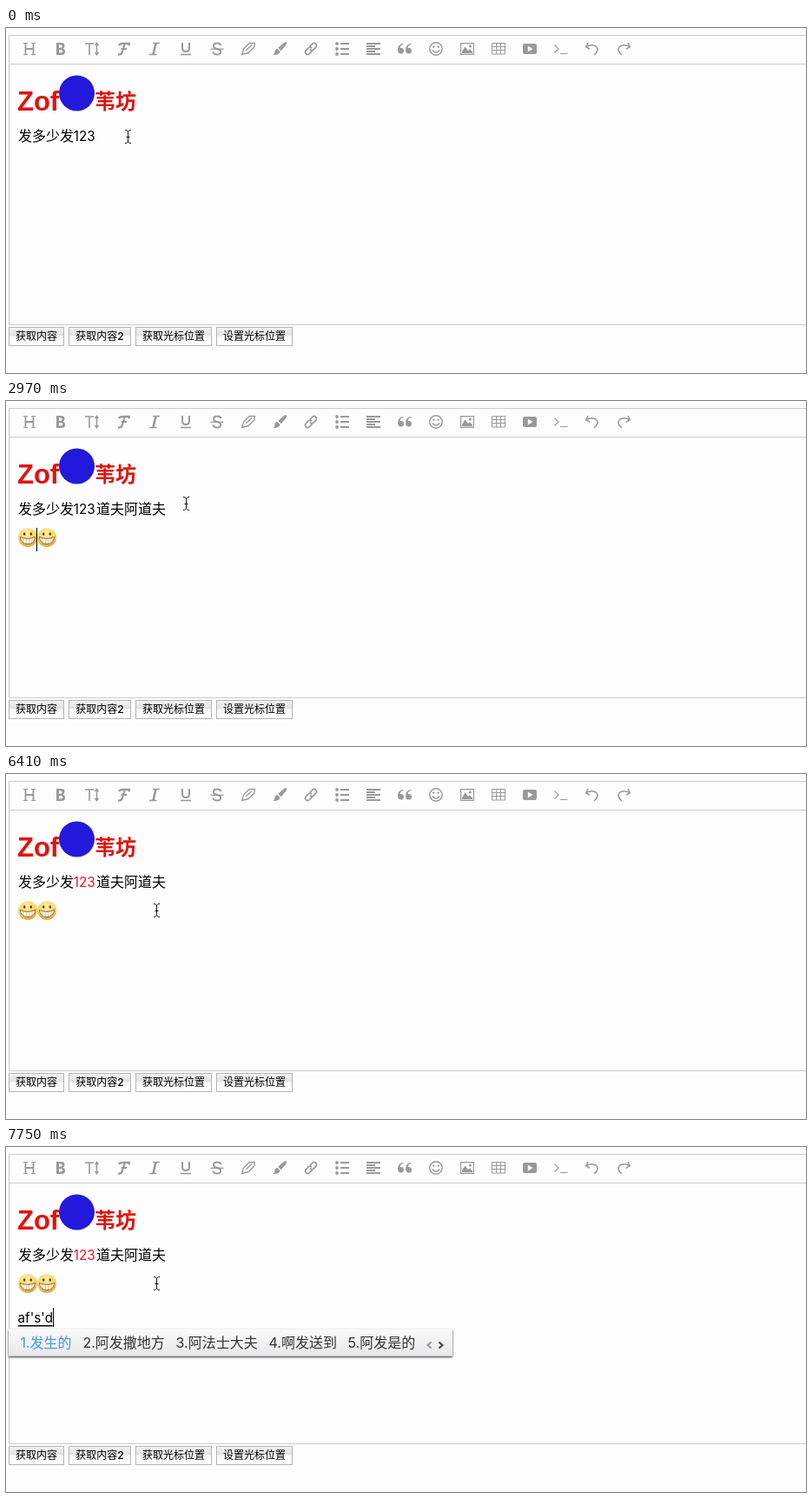
Write an HTML page that moves like this. It is 921x397 px and loops after 8000 ms.

```html
<!DOCTYPE html>
<html lang="zh-CN">
<head>
<meta charset="utf-8">
<title>Editor</title>
<style>
html, body { margin: 0; width: 100%; height: 100%; overflow: hidden; background: #fdfdfd; }
svg { display: block; width: 921px; height: 397px; }
text { font-family: Inter, "Noto Sans CJK SC", "Noto Sans CJK", "Noto Sans CJK JP", sans-serif; font-size: 16px; white-space: pre; }
.line { fill: none; stroke: #ccc; }
.latin { font-size: 15.2px; }
#tools { fill: none; stroke: #999; stroke-width: 1.6; }
#tools .solid { fill: #999; stroke: none; }
#tools .cut { fill: #fdfdfd; stroke: none; }
#buttons text { font-size: 12px; font-weight: 500; }
#buttons rect { fill: url(#btn); stroke: #b4b4b4; }
#brand text { font-weight: 700; fill: #e0140f; }
</style>
</head>
<body>
<svg viewBox="0 0 921 397">
  <defs>
    <linearGradient id="btn" x2="0" y2="1">
      <stop offset="0" stop-color="#f3f3f3"/>
      <stop offset=".42" stop-color="#e2e2e2"/>
      <stop offset=".5" stop-color="#f8f8f8"/>
      <stop offset="1" stop-color="#fff"/>
    </linearGradient>
    <linearGradient id="bar" x2="0" y2="1">
      <stop offset="0" stop-color="#fafafa"/>
      <stop offset="1" stop-color="#e7e7e9"/>
    </linearGradient>
    <radialGradient id="skin" cx=".45" cy=".3" r=".75">
      <stop offset="0" stop-color="#fff0a8"/>
      <stop offset=".6" stop-color="#fad465"/>
      <stop offset="1" stop-color="#d9952f"/>
    </radialGradient>
    <filter id="shade" x="-5%" y="-30%" width="110%" height="180%">
      <feDropShadow dx="0" dy="1.2" stdDeviation="1.2" flood-color="#000" flood-opacity=".9"/>
    </filter>
    <g id="grin">
      <ellipse rx="10.9" ry="10.8" fill="url(#skin)"/>
      <ellipse cx="-3.8" cy="-4" rx="1.3" ry="1.8" fill="#5c3a12"/>
      <ellipse cx="3.8" cy="-4" rx="1.3" ry="1.8" fill="#5c3a12"/>
      <path d="M-8.6-.6Q0 3.4 8.6-.6Q8 7.4 0 7.6Q-8 7.4-8.6-.6Z" fill="#fffdf2" stroke="#8a5a1c" stroke-width=".9"/>
      <path d="M-5 1V6M-1.7 1.6V7.4M1.7 1.6V7.4M5 1V6" stroke="#b99a62" stroke-width=".6"/>
    </g>
  </defs>

  <path class="line" d="M921 8.5H3.5V341.5H921M3.5 41.5H921"/>
  <g id="tools"></g>
  <g id="brand">
    <text x="13" y="95" style="font:700 31px 'Liberation Sans',Arial,sans-serif">Zof</text>
    <circle cx="81.5" cy="75" r="20.5" fill="#2319dc"/>
    <text x="102" y="93" style="font-size:24px">苇坊</text>
  </g>

  <text x="14" y="130">发多少发</text>
  <text id="digits" class="latin" x="77.8" y="130">123</text>
  <g id="added">
    <text x="104" y="130">道夫阿道夫</text>
    <use href="#grin" x="25" y="157"/>
    <use href="#grin" x="47" y="157"/>
  </g>
  <text id="typed" class="latin" x="13.6" y="202"></text>
  <rect id="under" x="14" y="205" height="1.5"/>
  <rect id="caret" width="1"/>

  <g id="picker">
    <rect x="3" y="209.5" width="511" height="31" fill="url(#bar)" filter="url(#shade)"/>
    <g id="words" fill="#333"></g>
    <path d="M489.5 224.5L485.5 228L489.5 231.5" fill="none" stroke="#999" stroke-width="2"/>
    <path d="M498.5 224.5L502.5 228L498.5 231.5" fill="none" stroke="#444" stroke-width="2.2"/>
  </g>

  <g id="buttons"></g>
  <g id="mouse" fill="none">
    <path d="M-3-7.5H-1.5L.5-6L2.5-7.5H4M.5-6V6M-3 7.5H-1.5L.5 6L2.5 7.5H4M-1.5 .5H2.5" stroke="#111"/>
  </g>
</svg>

<script>
const $ = id => document.getElementById(id);
const solid = d => `<path class="solid" fill-rule="evenodd" d="${d}"/>`;
const cut = d => `<path class="cut" d="${d}"/>`;
const path = (d, w = 1.6) => `<path d="${d}" stroke-width="${w}"/>`;

const undo = path("M-7-2.5Q-1-5.5 4-3Q9 1 2 7M-5-7L-7.3-2.3L-2.8 .3", 1.5);
const icons = [
  // heading, bold, size, font, italic
  path("M-4.5-6.5V6.5M4.5-6.5V6.5M-4.5 0H4.5", 1.8) + path("M-7-6.5H-2M2-6.5H7M-7 6.5H-2M2 6.5H7", 1.2),
  solid("M-5-7H1Q4.5-6.8 4.5-3.4Q4.4-1 2.5-.3Q5.2 .5 5.2 3.3Q5 7 1 7H-5ZM-2-4.7V-1.3H0Q1.6-1.4 1.6-3Q1.6-4.7 0-4.7ZM-2 1V4.6H.4Q2.2 4.5 2.2 2.8Q2.2 1 .4 1Z"),
  path("M-8-6H2M-3-6V7M5.5-5V5", 1.6) + solid("M5.5-8L8.3-4H2.7ZM5.5 8L8.3 4H2.7Z"),
  path("M-5-4Q-4-6.2-1-6.2H7L6.2-3.6M1.8-6L-1.5 4.5Q-2.5 7-6 6.5M-2.5 0H4", 2.2),
  path("M1.5-6.5L-1.5 6.5", 2.6) + path("M-2-6.5H6M-6 6.5H2.5", 1.4),
  path("M-4-7V-1Q-4 3 0 3Q4 3 4-1V-7", 2) + path("M-6 6.5H6", 1.6),
  path("M4.5-4Q3.5-6.7 0-6.5Q-4-6.4-4-3.5Q-4-1 0 0Q4.4 1.2 4.2 3.5Q4 6.5 0 6.5Q-4 6.5-4.8 3.5", 1.9) + path("M-7.5 .3H7.5", 1.3),
  // marker, brush, link
  path("M-7.3 6.5L-5.5 0L1-6.5H7.3L6.8-2L0 4.5ZM-2.8 1.7L4-4.5", 1.4),
  solid("M7.8-7.5Q8.8-6.5 7.2-4.3L1.7 2.2L-1.8-1.2L5.3-7.2Q7-8.4 7.8-7.5ZM-2.5 0L.5 3Q0 7.4-7.8 7Q-5.8 6-5.5 3Q-5-.2-2.5 0Z"),
  `<g transform="rotate(-45)">${path("M-1 2.8H-5Q-8 2.8-8 0Q-8-2.8-5-2.8H-2Q1.3-2.8 1.3 .3M1-2.8H5Q8-2.8 8 0Q8 2.8 5 2.8H2Q-1.3 2.8-1.3-.3", 1.7)}</g>`,
  // list, alignment, quote
  [-6, 0, 6].map(y => `<circle class="solid" cx="-6" cy="${y}" r="1.9"/>` + path(`M-2 ${y}H8`, 2)).join(""),
  [-6, -3, 0, 3, 6].map((y, i) => path(`M-8 ${y}H${i % 2 ? 2 : 8}`, 2)).join(""),
  [-8, 1].map(x => solid(`M${x + 6.5}-5Q${x + 2.6}-4.2 ${x + 2.7}-1Q${x + 7}-1.6 ${x + 7} 2.4Q${x + 6.8} 5.6 ${x + 3.5} 5.6Q${x} 5.4 ${x} 1Q${x + .2}-5.6 ${x + 6.5}-6Z`)).join(""),
  // smile, picture, table, video
  `<circle r="7.2" stroke-width="1.5"/><circle class="solid" cx="-2.7" cy="-2.4" r="1.2"/><circle class="solid" cx="2.7" cy="-2.4" r="1.2"/>` + path("M-4.2 1.5Q0 7 4.2 1.5", 1.5),
  path("M-7.4-6.4H7.4V6.4H-7.4Z", 1.2) + solid("M-6 5V3L-2.5-2.5L1 2L3 .2L6 3.5V5Z") + `<circle class="solid" cx="3.4" cy="-3" r="1.5"/>`,
  path("M-7.5-6.5H7.5V6H-7.5ZM-7.5-2.5H7.5M-7.5 1.5H7.5M-2.5-6.5V6M2.5-6.5V6", 1),
  solid("M-6-6H6Q8-6 8-4V4Q8 6 6 6H-6Q-8 6-8 4V-4Q-8-6-6-6Z") + cut("M-2.2-3.5L3.5 0L-2.2 3.5Z"),
  // terminal, undo, redo
  path("M-7.5-4.5L-3 0L-7.5 4.5M-1 5.5H7.5", 1.2),
  undo,
  `<g transform="scale(-1 1)">${undo}</g>`
];
$("tools").innerHTML = icons.map((s, i) => `<g transform="translate(${27 + i * 36} 24)">${s}</g>`).join("");

$("buttons").innerHTML = [[3, 64, "获取内容"], [72, 72, "获取内容2"], [149, 88, "获取光标位置"], [242, 88, "设置光标位置"]]
  .map(([x, w, s]) => `<rect x="${x + .5}" y="344.5" width="${w - 1}" height="21"/><text x="${x + w / 2}" y="359" text-anchor="middle">${s}</text>`).join("");

$("words").innerHTML = [[16.5, "发生的"], [88.5, "阿发撒地方"], [195.5, "阿法士大夫"], [302.5, "啊发送到"], [393.5, "阿发是的"]]
  .map(([x, s], i) => `<text x="${x}" y="231"${i ? "" : ' fill="#4398db"'}>${i + 1}.${s}</text>`).join("");

// [start ms, x]; no x means the caret is off
const carets = [[0], [290, 57], [440], [1040, 57], [1490], [1630, 35], [2080], [2680, 35], [3120], [3570, 35],
  [4170], [4610, 35], [5060], [5660, 35], [6410], [6710, 57], [7160, 14], [7460, 23], [7750, 54]];
const moves = [[0, 140, 125], [2820, 147, 125], [2970, 207, 118], [3120, 193, 140], [3270, 173, 157]];
const typing = [[0, "", 0], [7460, "a", 8], [7750, "af's'd", 39.5]];

const at = (steps, t) => steps.filter(s => s[0] <= t).pop();
const show = (id, on) => $(id).setAttribute("visibility", on ? "visible" : "hidden");
const set = (id, attrs) => { for (const k in attrs) $(id).setAttribute(k, attrs[k]); };

function draw(t) {
  const caretX = at(carets, t)[1];
  const [, mx, my] = at(moves, t);
  const [, word, width] = at(typing, t);
  const newLine = t >= 7160;
  show("caret", caretX !== undefined);
  set("caret", { x: caretX || 0, y: newLine ? 185 : 146, height: newLine ? 22 : 27 });
  set("mouse", { transform: `translate(${mx} ${my})` });
  set("digits", { fill: t >= 5810 ? "#f5102a" : "#000" });
  set("under", { width });
  $("typed").textContent = word;
  show("added", t >= 290);
  show("picker", t >= 7600);
}

const start = performance.now();
function tick() {
  draw((performance.now() - start) % 8000);
  requestAnimationFrame(tick);
}
tick();
</script>
</body>
</html>
```
